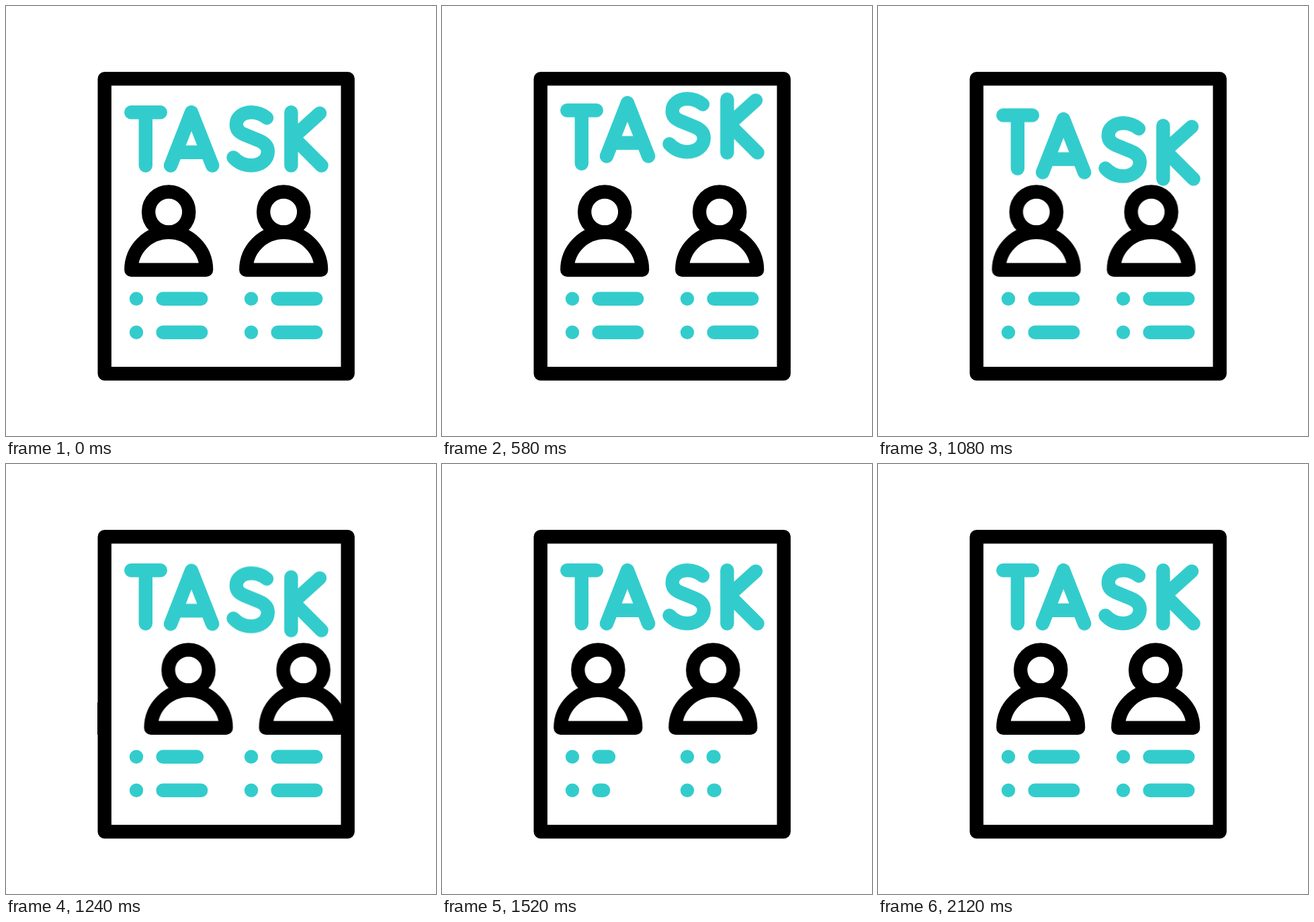
Animation, 640 px wide and 640 px high, one loop 2220 ms. Source, as an HTML page:

```html
<!DOCTYPE html>
<html lang="en">
<head>
<meta charset="utf-8">
<title>Task board</title>
<style>
  html, body { margin: 0; width: 100%; height: 100%; overflow: hidden; background: #fff; }
  svg { display: block; width: 100%; height: 100%; }

  .line { fill: none; stroke: #000; stroke-width: 20.4; stroke-linecap: round; stroke-linejoin: round; }
  .teal { stroke: #3cc; }

  .letter, .people, .bar {
    animation: 2220ms cubic-bezier(.3333, 0, .6667, 1) var(--delay, 0ms) infinite;
  }
  .letter { animation-name: bob; }
  .people { animation-name: slide; }
  .bar { animation-name: refill; }

  /* up, down, rest: 400 ms each */
  @keyframes bob {
    0%, 54.054%, 100% { transform: translateY(0); }
    18.018% { transform: translateY(-20.5px); }
    36.036% { transform: translateY(20.5px); }
  }

  /* small wind-up to the left, then one full step to the right */
  @keyframes slide {
    0%, 43.243% { transform: translateX(0); }
    52.252% { transform: translateX(-10px); }
    70.27%, 100% { transform: translateX(360px); }
  }

  /* shrink to a dot, grow past full length, settle */
  @keyframes refill {
    0%, 54.054% { d: path("M0 0H56.6"); }
    63.063% { d: path("M0 0H-0.9"); }
    81.081% { d: path("M0 0H69.1"); }
    90.09%, 100% { d: path("M0 0H56.6"); }
  }
</style>
</head>
<body>
<svg viewBox="0 0 640 640" role="img" aria-label="Task">
  <defs>
    <clipPath id="board"><rect x="136.5" y="98" width="382.4" height="459.4"/></clipPath>
    <g id="person">
      <circle cx="242.2" cy="306.6" r="30.1"/>
      <path d="M186.3 392.7a55.9 55.9 0 0 1 111.8 0z"/>
    </g>
    <g id="pair">
      <use href="#person"/>
      <use href="#person" x="171"/>
    </g>
  </defs>

  <rect class="line" x="146.7" y="108.2" width="362" height="439"/>

  <g clip-path="url(#board)">
    <g class="line people">
      <use href="#pair"/>
      <use href="#pair" x="-360"/>
    </g>
  </g>

  <g class="line teal">
    <path class="letter" d="M186.2 158.2H229.8M207.8 158.2V237.5"/>
    <path class="letter" style="--delay: 80ms" d="M245 237.5L276 158.2L307.2 237.5M252.7 217.8H299.4"/>
    <path class="letter" style="--delay: 160ms" d="M388 166.5C382 161.5 374 158.2 365 158.2C352 158.2 342.8 166 342.8 176.5C342.8 183 347 188 354 191L376 200C385 203.7 389.8 209 389.8 216.5C389.8 229 379 237.2 365 237.2C354 237.2 345 232.5 338.5 225.5"/>
    <path class="letter" style="--delay: 240ms" d="M424.4 158.2V237.5M467 159.7L427.4 195.4L469.6 237.5"/>

    <path d="M194 435.7h0M194 485.8h0M365 435.7h0M365 485.8h0"/>

    <g transform="translate(233.6 435.7)"><path class="bar" d="M0 0H56.6"/></g>
    <g transform="translate(233.6 485.8)"><path class="bar" style="--delay: 40ms" d="M0 0H56.6"/></g>
    <g transform="translate(404.6 485.8)"><path class="bar" style="--delay: 80ms" d="M0 0H56.6"/></g>
    <g transform="translate(404.6 435.7)"><path class="bar" style="--delay: 120ms" d="M0 0H56.6"/></g>
  </g>
</svg>
</body>
</html>
```
